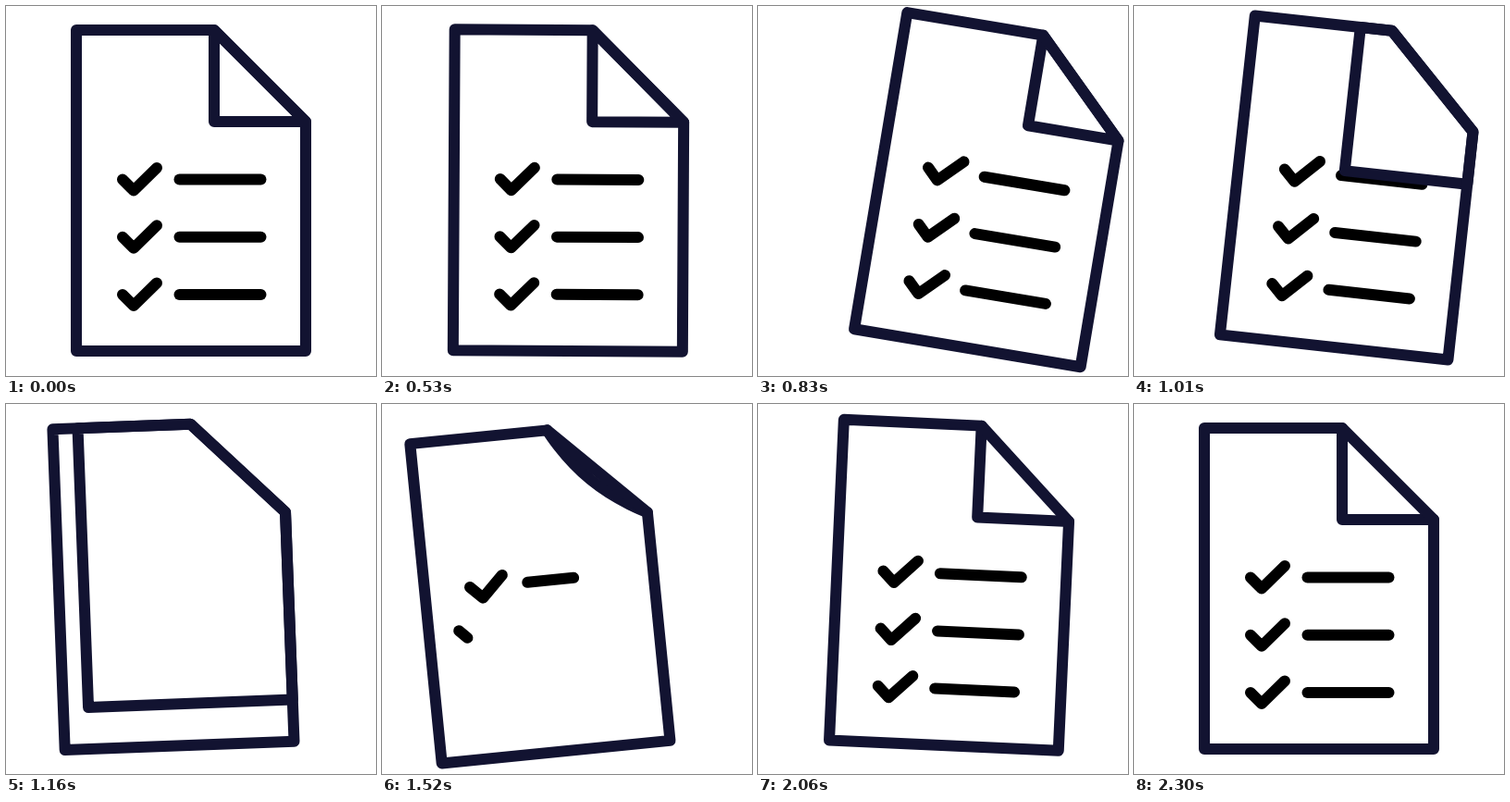
Animation, 400 px wide and 400 px high, one loop 2330 ms. Source, as an HTML page with a canvas:

```html
<!DOCTYPE html>
<html lang="en">
<head>
<meta charset="utf-8">
<title>Checklist page</title>
<style>
  html, body { margin: 0; width: 100%; height: 100%; overflow: hidden; background: #fff; }
  canvas { display: block; }
</style>
</head>
<body>
<canvas id="stage" width="400" height="400"></canvas>
<script>
const ctx = document.getElementById("stage").getContext("2d");
const LOOP = 2330, HOLD = 530, STEP = 30, START = 500;
const REDRAW = 1245;   // the old list is fully covered by now
const NEW_FOLD = 1351;
const INK = "#121331";
const LEFT = 76, TOP = 26, RIGHT = 324, BOTTOM = 373, FOLD = 99;
const FOLD_X = RIGHT - FOLD, FOLD_Y = TOP + FOLD;

function ease(t, start, duration) {
  const u = Math.min(1, Math.max(0, (t - start) / duration));
  return u * u * (3 - 2 * u);
}

// Swing right, left, right again, then settle
function poseAt(t) {
  const out = ease(t, START, 280);
  const back = ease(t, 1410, 450);
  const settle = ease(t, 1860, 440);
  return {
    tilt: 9.5 * out - 17 * ease(t, 890, 430) + 12.1 * back - 4.6 * settle,
    x: 55 * out - 92 * ease(t, 902, 360) + 52.5 * back - 15.5 * settle,
    y: -3.5 * ease(t, 700, 400) + 7.5 * ease(t, 1160, 360) - 10.5 * ease(t, 1540, 310) + 6.5 * settle
  };
}

function trace(points, closed) {
  ctx.beginPath();
  for (const [x, y] of points) ctx.lineTo(x, y);
  if (closed) ctx.closePath();
}

function strokePart(points, start, length) {
  if (length < 0.5) return;
  ctx.setLineDash([length, 999]);
  ctx.lineDashOffset = -start;
  trace(points);
  ctx.stroke();
  ctx.setLineDash([]);
}

function drawList(t) {
  ctx.strokeStyle = "#000";
  for (let row = 0; row < 3; row++) {
    const y = 187.5 + 62.2 * row;
    const tick = t < REDRAW ? 1 : ease(t, REDRAW + 180 * row, 305);
    const bar = t < REDRAW ? 1 : ease(t, 1285 + row * (288 - 48 * row), 430);
    // The tick slides in along a lead-in before its first point
    strokePart([[107.6, y - 18.4], [138, y + 12], [163, y - 12.5]], 26 * tick * tick, 52 * tick);
    strokePart([[187.5, y], [275.5, y]], 0, 88 * bar);
  }
}

// The folded sheet sweeps down to the lower left corner
function drawTurningSheet(t) {
  const p = ease(t, 898, 360);
  const x = FOLD_X + (LEFT - FOLD_X) * p;
  const y = FOLD_Y + (BOTTOM - FOLD_Y) * p;
  ctx.fillStyle = "#fff";
  ctx.strokeStyle = INK;
  trace([[x, TOP], [FOLD_X, TOP], [RIGHT, FOLD_Y], [RIGHT, y], [x, y]], true);
  ctx.fill();
  ctx.stroke();
}

// A new corner bends open from the diagonal
function drawNewFold(t) {
  const p = ease(t, NEW_FOLD, 655);
  const x = FOLD_X + FOLD / 2 * (1 - p);
  const y = FOLD_Y - FOLD / 2 * (1 - p);
  const bend = 32 * (1 - p);
  ctx.strokeStyle = INK;
  ctx.beginPath();
  ctx.moveTo(FOLD_X, TOP);
  ctx.bezierCurveTo(FOLD_X, TOP, x - bend, y - bend, x, y);
  ctx.bezierCurveTo(x + bend, y + bend, RIGHT, FOLD_Y, RIGHT, FOLD_Y);
  ctx.stroke();
}

function draw(t) {
  const pose = poseAt(t);
  ctx.setTransform(1, 0, 0, 1, 0, 0);
  ctx.fillStyle = "#fff";
  ctx.fillRect(0, 0, 400, 400);
  ctx.translate(200 + pose.x, 199.5 + pose.y);
  ctx.rotate(pose.tilt * Math.PI / 180);
  ctx.translate(-200, -199.5);
  ctx.lineWidth = 12;
  ctx.lineCap = ctx.lineJoin = "round";

  if (t < REDRAW) drawList(t);
  if (t < NEW_FOLD) drawTurningSheet(t);
  else drawNewFold(t);
  if (t >= REDRAW) drawList(t);

  ctx.strokeStyle = INK;
  trace([[LEFT, TOP], [FOLD_X, TOP], [RIGHT, FOLD_Y], [RIGHT, BOTTOM], [LEFT, BOTTOM]], true);
  ctx.stroke();
}

const origin = performance.now();
function play() {
  const t = (performance.now() - origin) % LOOP;
  draw(t < HOLD ? START : HOLD + STEP * Math.floor((t - HOLD) / STEP));
  requestAnimationFrame(play);
}
play();
</script>
</body>
</html>
```
